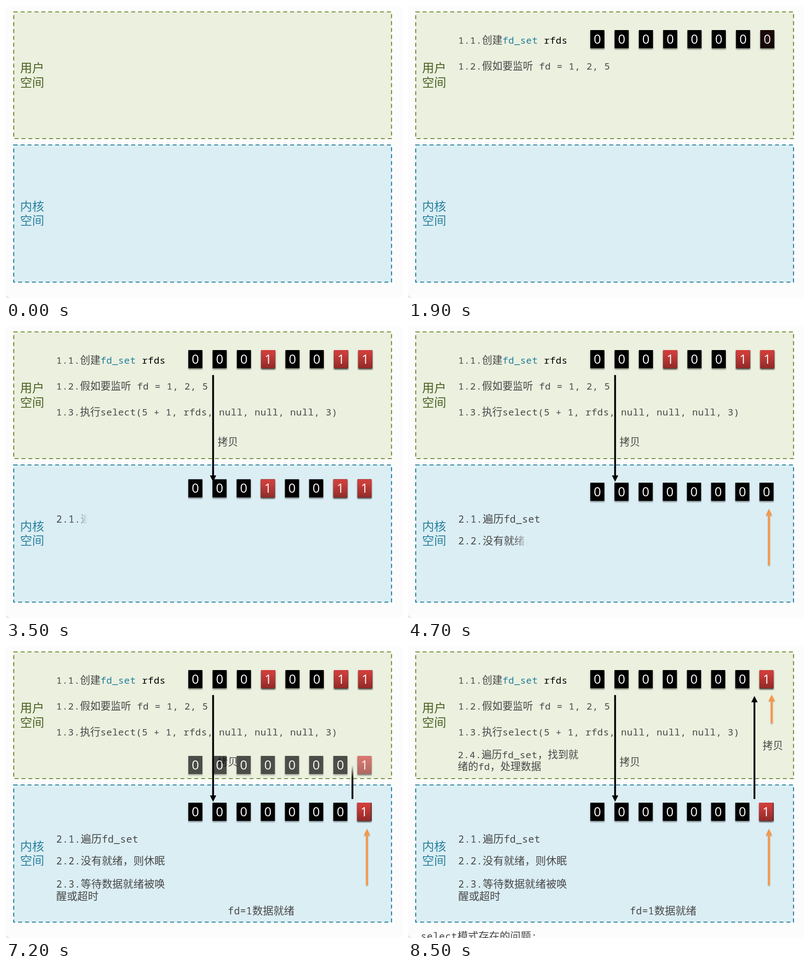
Recreate the animation shown at these times as an HTML page. Size 871 px wide and 643 px high, loop 9.2 s.

```html
<!DOCTYPE html>
<html lang="zh-CN">
<head>
<meta charset="utf-8">
<title>select</title>
<style>
  html, body { margin: 0; width: 100%; height: 100%; overflow: hidden; background: #fcfcfc; }
  svg { display: block; }
  text { white-space: pre; fill: #484848; font-family: "Noto Sans CJK SC", "Noto Sans CJK", sans-serif; }
  .mono { font-family: "Noto Sans Mono", monospace; }
  .bit { font: 500 28px "Open Sans", "Noto Sans", sans-serif; fill: #fff; text-anchor: middle; }
  .side { font-size: 26.5px; }
</style>
</head>
<body>
<svg id="stage" width="871" height="643" viewBox="0 0 871 643">
  <defs>
    <linearGradient id="red" x2="0" y2="1">
      <stop stop-color="#d03e3b"/><stop offset=".25" stop-color="#c83b38"/><stop offset="1" stop-color="#902a28"/>
    </linearGradient>
    <filter id="shade" x="-30%" y="-20%" width="160%" height="150%">
      <feDropShadow dx="0" dy="2.5" stdDeviation="1.8" flood-opacity=".45"/>
    </filter>
    <filter id="soft" filterUnits="userSpaceOnUse" x="-20" y="-10" width="40" height="160">
      <feDropShadow dx="0" dy="2" stdDeviation="1.3" flood-opacity=".3"/>
    </filter>
  </defs>
  <path d="M0 637Q1 642 7 643" fill="none" stroke="#b4b4b4"/>
  <g stroke-width="2.2" stroke-dasharray="8.7 6.5">
    <rect x="17" y="13" width="831" height="279" fill="#ebf0df" stroke="#708c30"/>
    <rect x="17" y="306" width="831" height="302" fill="#dbeef4" stroke="#207e9b"/>
  </g>
  <g class="side">
    <g style="--ink:#4a6120"><text x="31" y="146">用户</text><text x="31" y="177.5">空间</text></g>
    <g style="--ink:#2a829d"><text x="31" y="450.5">内核</text><text x="31" y="481.5">空间</text></g>
  </g>
  <style>.side text { fill: var(--ink); }</style>
</svg>
<script>
const LOOP = 9200, STEP = 100, EDGE = 0.13;
const TOP = 73, BOTTOM = 365, BITS = 8;
const SMALL = 22.5, LARGE = 23.2;
const TINTS = { fd_set: '#1f7f9b', ' rfds': '#000' };

const stage = document.getElementById('stage');
const defs = stage.querySelector('defs');
const updates = [];

const clamp = v => Math.max(0, Math.min(1, v));
const progress = (t, start, dur) => clamp((t - start) / dur);
const inOut = p => p < 0.5 ? 2 * p * p : 1 - 2 * (1 - p) ** 2;
const mix = (a, b, p) => a + (b - a) * p;
const show = (node, on) => node.style.display = on ? '' : 'none';
const place = (node, x, y) => node.setAttribute('transform', `translate(${x} ${y})`);
const userX = i => 416.5 + 53.4 * i;
const kernelX = i => 416.5 + 53.15 * i;

function add(parent, tag, attrs = {}, content) {
  const node = document.createElementNS('http://www.w3.org/2000/svg', tag);
  for (const key in attrs) node.setAttribute(key, attrs[key]);
  if (content) node.textContent = content;
  parent.appendChild(node);
  return node;
}

// Soft-edged reveal from one point towards another.
let wipes = 0;
function wipe(node, from, to, start, dur = 300) {
  const id = 'wipe' + wipes++;
  const grad = add(defs, 'linearGradient', { id, gradientUnits: 'userSpaceOnUse' });
  add(grad, 'stop', { 'stop-color': '#fff' });
  add(grad, 'stop', { offset: 1, 'stop-color': '#fff', 'stop-opacity': 0 });
  const mask = add(defs, 'mask', {
    id: id + 'm', maskUnits: 'userSpaceOnUse', x: 0, y: 0, width: 871, height: 643 });
  add(mask, 'rect', { width: 871, height: 643, fill: `url(#${id})` });
  updates.push(t => {
    const p = progress(t, start, dur), tip = p * (1 + EDGE);
    show(node, p > 0);
    if (p < 1) node.setAttribute('mask', `url(#${id}m)`);
    else node.removeAttribute('mask');
    [tip - EDGE, tip].forEach((f, i) => {
      grad.setAttribute('x' + (i + 1), mix(from[0], to[0], f));
      grad.setAttribute('y' + (i + 1), mix(from[1], to[1], f));
    });
  });
}

// Lines of mixed Latin and CJK text, wiped in from the left.
function note(x, y, size, start, lines, tinted) {
  const g = add(stage, 'g');
  const latinSize = size * 0.92, spacing = size * 0.58 - latinSize * 0.6;
  const widths = lines.map((str, i) => {
    const line = add(g, 'text', { x, y: y + i * size * 1.18, 'font-size': size });
    for (const run of str.match(/fd_set|[ -~]+?(?=fd_set|[^ -~]|$)|[^ -~]+/g)) {
      const part = add(line, 'tspan', run.charCodeAt(0) < 128
        ? { class: 'mono', 'font-size': latinSize, 'letter-spacing': spacing } : {}, run);
      if (tinted && TINTS[run]) part.style.fill = TINTS[run];
    }
    return line.getComputedTextLength();
  });
  wipe(g, [x, 0], [x + Math.max(...widths), 0], start);
}

function arrow(x, tail, tip, color, width) {
  const g = add(stage, 'g'), back = tip + Math.sign(tail - tip) * 14;
  add(g, 'path', { d: `M${x} ${tail}V${back}`, stroke: color, 'stroke-width': width });
  add(g, 'path', { d: `M${x - 7} ${back}L${x} ${tip}L${x + 7} ${back}Z`, fill: color });
  return g;
}

function pointer(length) {
  const g = add(stage, 'g'), inner = arrow(0, length, 0, '#f79646', 4.5);
  inner.setAttribute('filter', 'url(#soft)');
  g.appendChild(inner);
  return { g, inner };
}

function bit(parent, x, y, value) {
  const g = add(parent, 'g');
  place(g, x, y);
  add(g, 'rect', { x: -15.5, y: -20, width: 31, height: 40, filter: 'url(#shade)',
    fill: value ? 'url(#red)' : '#000' });
  add(g, 'text', { class: 'bit', y: 10 }, String(value));
  return g;
}

// A row of bits that fades in while it slides between the two spaces.
function slidingRow(from, to, start, dur) {
  const row = add(stage, 'g');
  for (let i = 0; i < BITS; i++) bit(row, kernelX(i), 0, 0);
  updates.push(t => {
    const p = inOut(progress(t, start, dur));
    show(row, p > 0);
    place(row, 0, mix(from, to, p));
    row.style.opacity = 0.5 + p / 2;
  });
  return row;
}

// User-space bits fly in from the right, then the watched ones turn red.
const userRow = add(stage, 'g');
updates.push(t => show(userRow, t < 7500));
for (let i = 0; i < BITS; i++) {
  const box = bit(userRow, userX(i), TOP, 0);
  updates.push(t => {
    const p = progress(t, 1080 + 40 * Math.min(i, 1) * 3 + 18 * i, 200 - 8 * i);
    show(box, p > 0);
    place(box, mix(892, userX(i), p), TOP);
  });
}
const watched = [
  { slot: 7, start: 1840, end: 2300 },
  { slot: 6, start: 2410, end: 2600 },
  { slot: 3, start: 2750, end: 2800 },
];
for (const { slot, start, end } of watched) {
  const box = bit(userRow, userX(slot), TOP, 1);
  updates.push(t => box.style.opacity = progress(t, start, end - start));
}

note(110.5, 83, SMALL, 580, ['1.1.创建fd_set rfds'], true);
note(110.5, 140, SMALL, 1380, ['1.2.假如要监听 fd = 1, 2, 5']);
note(110.5, 196.5, SMALL, 2820, ['1.3.执行select(5 + 1, rfds, null, null, null, 3)']);
wipe(arrow(455.5, 108, 343, '#000', 4), [0, 108], [0, 343], 3120, 350);
note(465.5, 263, SMALL, 3200, ['拷贝']);
note(110.5, 433, LARGE, 3400, ['2.1.遍历fd_set']);
note(110.5, 481, LARGE, 4530, ['2.2.没有就绪，则休眠']);
note(110.5, 531.5, LARGE, 4850, ['2.3.等待数据就绪被唤', '醒或超时']);
note(488, 591, LARGE, 5170, ['fd=1数据就绪']);

// Copy into the kernel; the watched bits clear, then one becomes ready.
const kernelRow = slidingRow(TOP, BOTTOM, 3110, 440);
const kernelReds = add(kernelRow, 'g');
for (const { slot } of watched) bit(kernelReds, kernelX(slot), 0, 1);
const ready = bit(kernelRow, kernelX(7) - 1, 0, 1);
updates.push(t => {
  show(kernelReds, t < 4500);
  ready.style.opacity = progress(t, 5920, 180);
});

// Scanning pointer, two passes from left to right.
const scan = pointer(124);
updates.push(t => {
  show(scan.g, t >= 3700);
  const p = t < 5400 ? progress(t, 3700, 600) : progress(t, 5400, 400);
  place(scan.g, mix(407, 794, inOut(p)), 402.5);
});

// Copy back to user space.
wipe(arrow(762, 337, 110, '#000', 4), [0, 337], [0, 110], 7070, 450);
note(780, 227, SMALL, 7420, ['拷贝']);
const resultRow = slidingRow(BOTTOM, TOP, 6990, 500);
bit(resultRow, kernelX(7), 0, 1);

note(109.5, 246.5, SMALL, 7750, ['2.4.遍历fd_set，找到就', '绪的fd，处理数据']);
const found = pointer(63);
place(found.inner, 800, 107);
wipe(found.g, [0, 172], [0, 105], 7980);
note(28, 646.5, LARGE, 8190, ['select模式存在的问题:']);

const began = performance.now();
function draw() {
  const t = Math.floor((performance.now() - began) % LOOP / STEP) * STEP;
  for (const update of updates) update(t);
  requestAnimationFrame(draw);
}
draw();
</script>
</body>
</html>
```
